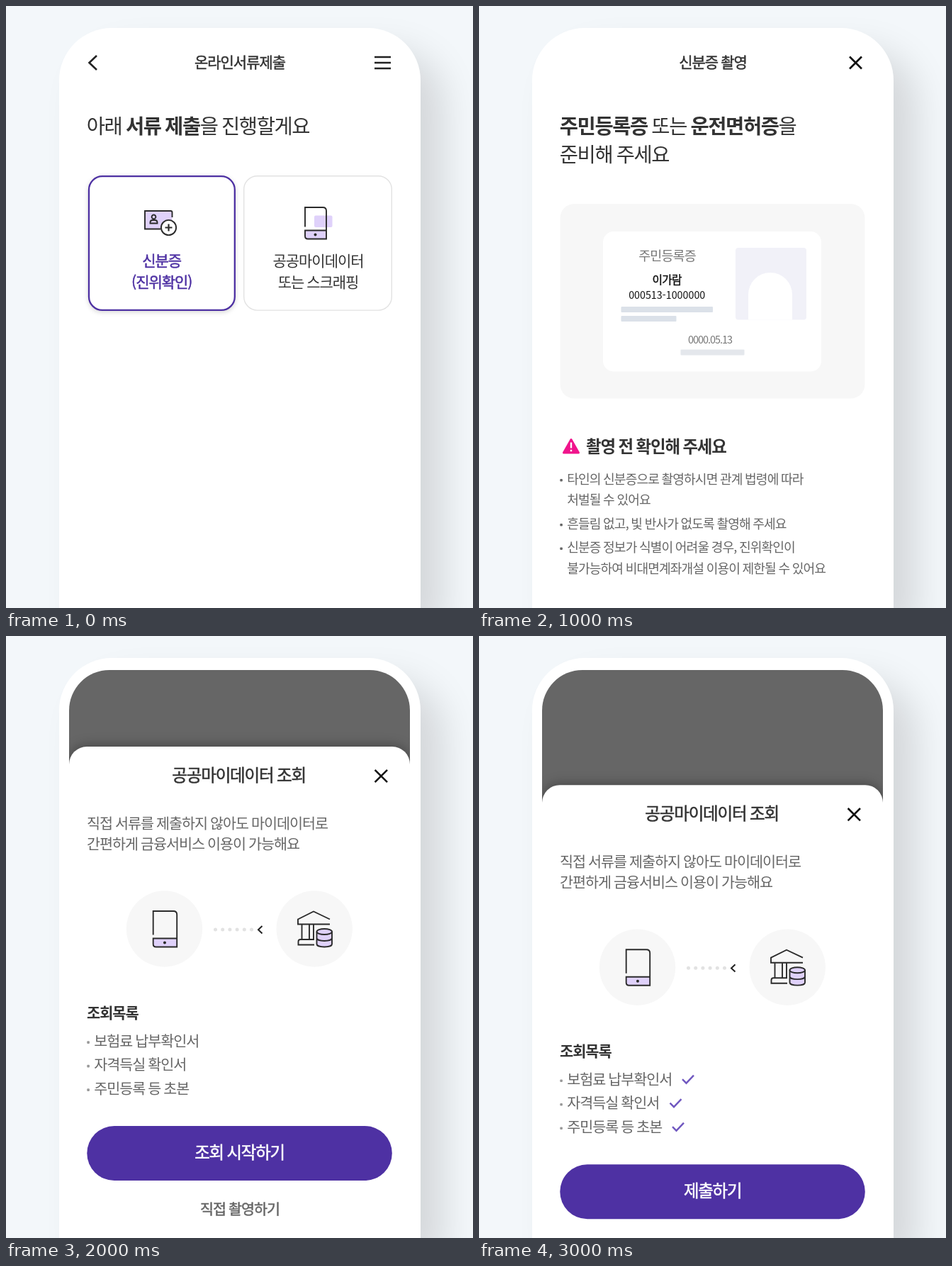
Recreate the animation shown at these times as an HTML page. Size 659 px wide and 849 px high, loop 4 s.

```html
<!DOCTYPE html>
<html lang="ko">
<head>
<meta charset="utf-8">
<title>서류 제출 안내</title>
<style>
  html, body { margin: 0; width: 100%; height: 100%; overflow: hidden; background: #f3f7fa; }
  .view { position: fixed; inset: 0; overflow: hidden; contain: strict; }
  .phone {
    position: absolute; left: 75px; top: 31px; width: 510px; bottom: 0;
    border-radius: 74px 74px 0 0; background: #fff;
    box-shadow: 32px 32px 52px rgba(0, 0, 0, .13);
  }
  svg { position: absolute; left: 0; top: 0; width: 100%; height: 100%; overflow: hidden; }
  text {
    font-family: "Noto Sans CJK KR", "Noto Sans KR", "Noto Sans CJK", sans-serif;
    letter-spacing: -.05em;
    word-spacing: -.035em;
    white-space: pre;
  }
  .b { font-weight: 700; }
  .card { filter: drop-shadow(0 2px 3px rgba(0, 0, 0, .16)); }
  .sheet { filter: drop-shadow(0 -2px 8px rgba(0, 0, 0, .3)); }
  .line { fill: none; stroke: #2b2b2b; stroke-width: 1.9; }
</style>
</head>
<body>
<div class="view">
  <div class="phone"></div>
  <svg id="stage" viewBox="0 0 659 849" preserveAspectRatio="xMinYMin"></svg>
</div>
<script>
const INK = '#2b2b2b', GRAY = '#666', PURPLE = '#4e31a3', LILAC = '#dfd1fa', PALE = '#f7f7f7';
const STEP = 1000;

// Text placed by the middle of its glyph height; a thin outline gives the medium weight.
function text(x, mid, size, str, { fill = '#333', weight = 400, anchor = 'start', extra = '' } = {}) {
  const y = (mid + size * 0.37).toFixed(2);
  const outline = weight === 500 ? `stroke="${fill}" stroke-width="${(size * 0.024).toFixed(2)}"` : '';
  return `<text x="${x}" y="${y}" font-size="${size}" font-weight="${weight}" fill="${fill}" text-anchor="${anchor}" ${outline} ${extra}>${str}</text>`;
}
const mid = (x, y, size, str, opt) => text(x, y, size, str, { anchor: 'middle', ...opt });
const rect = (x, y, w, h, r, fill, extra = '') =>
  `<rect x="${x}" y="${y}" width="${w}" height="${h}" rx="${r}" fill="${fill}" ${extra}/>`;
const disc = (x, y, r, fill, extra = '') =>
  `<circle cx="${x}" cy="${y}" r="${r}" fill="${fill}" ${extra}/>`;
const line = (d, extra = '') => `<path class="line" d="${d}" ${extra}/>`;
const stroke = (d, color, width) =>
  `<path d="${d}" fill="none" stroke="${color}" stroke-width="${width}"/>`;
const cross = (x, y, r) =>
  stroke(`M${x - r} ${y - r}l${2 * r} ${2 * r}m0 ${-2 * r}l${-2 * r} ${2 * r}`, '#111', 2.6);
const bullet = (y, fill) => rect(114.3, y, 3.6, 3.6, 1, fill);

function phoneIcon(x, y, w, h) {
  const bar = h - 12;
  return `<path d="M${x} ${y + bar}h${w}v12h${4 - w}q-4 0-4-4z" fill="${LILAC}"/>` +
    line(`M${x} ${y + bar - 5}V${y}H${x + w - 5}q5 0 5 5V${y + h}H${x + 4}q-4 0-4-4V${y + bar}H${x + w}`) +
    disc(x + w / 2 - 0.5, y + h - 6, 2, INK);
}

function idIcon() {
  return rect(196, 289, 38.5, 25, 0, LILAC) +
    line('M234.5 298V291q0-2-2-2H196V314.5H218') +
    line('M208.5 294.5a2.9 2.9 0 1 0 .01 0M203.5 306.5v-1q0-3.5 3.5-3.5h3q3.5 0 3.5 3.5v1z') +
    disc(229.5, 312.5, 10.6, '#fff', `stroke="${INK}" stroke-width="1.9"`) +
    line('M224.5 312.5h10m-5-5v10', 'style="stroke-width:2.2"');
}

function bankIcon() {
  return line('M457 406.5H412V399.5L434 388.5L457 399.5') +
    line('M417.5 407V428M428 407V428M434 407V428') +
    line('M435 435.5H412.5V431q0-3 3-3H435') +
    `<path d="M438.5 417v17.5c0 5.3 21.5 5.3 21.5 0V417z" fill="${LILAC}"/>` +
    line('M438.5 417v17.5c0 5.3 21.5 5.3 21.5 0V417M438.5 426c0 5.3 21.5 5.3 21.5 0') +
    `<ellipse class="line" cx="449.25" cy="417" rx="10.75" ry="4" style="fill:${LILAC}"/>`;
}

function menuScene() {
  const pick = { fill: PURPLE, weight: 500 };
  return stroke('M128 70L117.5 80L128 90', '#222', 2.6) +
    mid(330, 79.5, 21, '온라인서류제출', { weight: 500 }) +
    stroke('M520 72h23m-23 8h23m-23 8h23', '#222', 2.5) +
    text(113.8, 169.6, 28.5, '아래 <tspan class="b">서류 제출</tspan>을 진행할게요') +
    rect(117, 240.2, 205.8, 188.7, 19, '#fff', `class="card" stroke="${PURPLE}" stroke-width="2.3"`) +
    rect(335.7, 239.7, 208.6, 189.4, 19, '#fff', 'stroke="#e2e2e2" stroke-width="1.4"') +
    idIcon() +
    mid(219.7, 359.5, 21, '신분증', pick) +
    mid(219.7, 389, 21, '(진위확인)', pick) +
    rect(435, 295.5, 25.5, 16.5, 2, LILAC) +
    phoneIcon(422, 284, 30, 44.5) +
    mid(440.5, 359.5, 21, '공공마이데이터') +
    mid(440.5, 389, 21, '또는 스크래핑');
}

function captureScene() {
  const notes = [
    [667, '타인의 신분증으로 촬영하시면 관계 법령에 따라'],
    [696.5, '처벌될 수 있어요'],
    [730, '흔들림 없고, 빛 반사가 없도록 촬영해 주세요'],
    [763.5, '신분증 정보가 식별이 어려울 경우, 진위확인이'],
    [793, '불가능하여 비대면계좌개설 이용이 제한될 수 있어요']
  ];
  return mid(330, 79.5, 21, '신분증 촬영', { weight: 500 }) +
    cross(531.5, 80, 8.5) +
    text(113.8, 169.6, 28.5, '<tspan class="b">주민등록증</tspan> 또는 <tspan class="b">운전면허증</tspan>을') +
    text(113.8, 209.6, 28.5, '준비해 주세요') +
    rect(114.5, 279, 430, 274.5, 20, PALE) +
    rect(175, 318, 308, 197.5, 15, '#fff') +
    mid(265.5, 352, 18.5, '주민등록증', { fill: '#777' }) +
    mid(265.2, 386, 15.8, '이가람', { fill: '#111', weight: 500 }) +
    mid(265.2, 407.8, 14.3, '000513-1000000', { fill: '#111', extra: 'style="letter-spacing:0"' }) +
    rect(200.5, 424, 129.5, 8, 1, '#dbe1e9') +
    rect(200.5, 437, 78, 8, 1, '#dbe1e9') +
    mid(326, 470.8, 14.4, '0000.05.13', { fill: '#777', extra: 'style="letter-spacing:-.07em"' }) +
    rect(284.5, 484.5, 90, 8, 1, '#e4e7ec') +
    rect(362, 341, 100, 101.5, 4, '#f1f1f8') +
    '<path d="M380 442.5V407a31 31 0 0 1 62 0v35.5z" fill="#fff"/>' +
    '<path d="M130 611.5L140.5 630H119.5z" fill="#f0148c" stroke="#f0148c" stroke-width="3" stroke-linejoin="round"/>' +
    stroke('M130 615.5v8m0 2.2v2.6', '#fff', 2.4) +
    text(151, 621, 23.5, '촬영 전 확인해 주세요', { weight: 700 }) +
    [667, 730, 763.5].map(y => bullet(y, GRAY)).join('') +
    notes.map(([y, s]) => text(124.2, y, 18.15, s, { fill: GRAY })).join('');
}

function sheetScene(dy, done) {
  const items = [
    [571, '보험료 납부확인서', 287],
    [604.5, '자격득실 확인서', 269.5],
    [638, '주민등록 등 초본', 273]
  ];
  const list = items.map(([y, s, x]) =>
    bullet(y + 0.3, '#999') + text(124.2, y, 20.7, s, { fill: GRAY }) +
    (done ? stroke(`M${x} ${y}l5.5 5.5l10.5-11`, '#7058c0', 2.4) : '')).join('');
  const dots = Array.from({ length: 6 }, (_, i) => disc(295.5 + i * 10.2, 414, 2.5, '#e2e2e2')).join('');
  return `<g clip-path="url(#screen)">${rect(89, 48, 481, 801, 0, '#666')}
    <g transform="translate(0 ${dy})">${rect(89, 156, 481, 740, 25, '#fff', 'class="sheet"')}</g></g>
    <g transform="translate(0 ${dy})">` +
    mid(328.6, 196.5, 23.5, '공공마이데이터 조회', { weight: 500 }) +
    cross(529.3, 197.5, 8.7) +
    text(114, 264, 20.7, '직접 서류를 제출하지 않아도 마이데이터로', { fill: GRAY }) +
    text(114, 293.5, 20.7, '간편하게 금융서비스 이용이 가능해요', { fill: GRAY }) +
    disc(223.5, 413, 53.7, PALE) + disc(435.2, 413, 53.7, PALE) +
    phoneIcon(207.7, 388, 33.5, 50.5) +
    dots + stroke('M361.5 409L356 414.2L361.5 419.4', '#222', 2) +
    bankIcon() +
    text(114, 531, 20.9, '조회목록', { weight: 700 }) +
    list +
    rect(114.3, 691, 430.5, 77, 38.5, PURPLE) +
    mid(329.6, 728.5, 23.4, done ? '제출하기' : '조회 시작하기', { fill: '#fff', weight: 500 }) +
    (done ? '' : mid(330, 808.5, 20.7, '직접 촬영하기', { fill: GRAY, weight: 500 })) +
    '</g>';
}

const scenes = [menuScene(), captureScene(), sheetScene(0, false), sheetScene(54.2, true)];
const stage = document.getElementById('stage');
stage.innerHTML =
  `<defs><clipPath id="screen">${rect(89, 48, 481, 900, 57, '#000')}</clipPath></defs>` +
  scenes.map((s, i) => `<g class="scene" visibility="${i ? 'hidden' : 'visible'}">${s}</g>`).join('');

const groups = stage.querySelectorAll('.scene');
const start = performance.now();
let shown = 0;
function draw() {
  const now = Math.floor((performance.now() - start) / STEP) % scenes.length;
  if (now !== shown) {
    groups[shown].setAttribute('visibility', 'hidden');
    groups[now].setAttribute('visibility', 'visible');
    shown = now;
  }
  requestAnimationFrame(draw);
}
requestAnimationFrame(draw);
</script>
</body>
</html>
```
